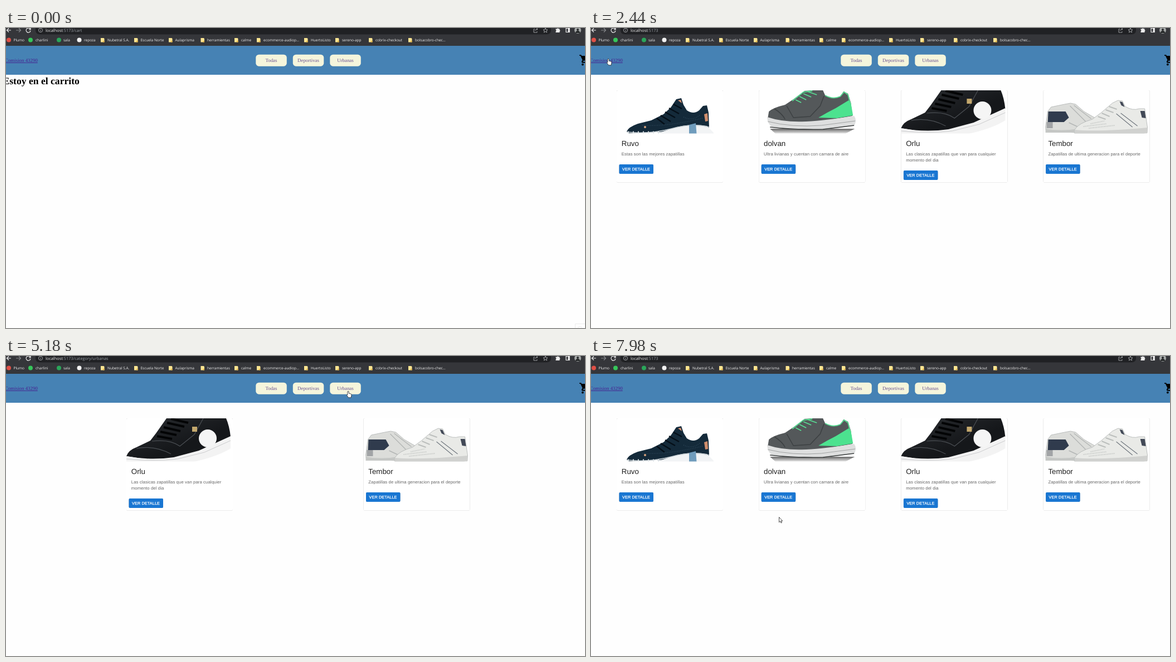
Recreate the animation shown at these times as an HTML page. Size 1039 by 539 pixels, loop 8 s.

```html
<!DOCTYPE html>
<html lang="es">
<head>
<meta charset="utf-8">
<title>Tienda de zapatillas</title>
<style>
html, body { margin: 0; width: 100%; height: 100%; overflow: hidden; background: #fefefe; }
svg { display: block; text-rendering: geometricPrecision; }
.ui { font: 6.5px "Open Sans", "Noto Sans", sans-serif; fill: #f1f1f1; }
.url { font-size: 7.35px; }
.nav { font: 8.87px "Liberation Serif", "Times New Roman", serif; fill: #482090; }
.tab { fill: #6a5290; }
.title { font: 13.3px "Liberation Sans", Arial, sans-serif; fill: #212121; }
.body { font: 7.76px "Liberation Sans", Arial, sans-serif; fill: #666; letter-spacing: .083px; }
.btn { font: 7.2px "Liberation Sans", Arial, sans-serif; fill: #fff; stroke: #fff; stroke-width: .25; letter-spacing: .17px; }
.card { fill: #fff; filter: drop-shadow(0 .8px .6px rgba(0,0,0,.32)); }
.raised { fill: #1976d2; filter: drop-shadow(0 .9px .7px rgba(0,0,0,.4)); }
</style>
</head>
<body>
<svg id="stage" width="1039" height="539" viewBox="0 0 1039 539">
  <defs>
    <clipPath id="photo"><path d="M0 0H191V77.5H0z"/></clipPath>
    <linearGradient id="mirror" x2="0" y2="1"><stop stop-color="#666"/><stop offset="1" stop-color="#eee"/></linearGradient>
    <linearGradient id="leather" y2="1"><stop stop-color="#2b2e32"/><stop offset=".6" stop-color="#15171a"/></linearGradient>

    <g id="trainer">
      <path d="M18 74Q21 66 38 60L62 54 84 43 97 31 107 16 116 14 120 26 126 36Q138 44 148 36L155 28 162 27 165 40 166 67 130 64 96 74 22 77z" fill="#142a3a"/>
      <path d="M74 77L98 69Q130 58 162 64L174 76V78H74z" fill="#f2f4f5"/>
      <path d="M18 75Q60 79 98 69T166 66" fill="none" stroke="#cfd6da" stroke-width="1.5"/>
      <path d="M20 75.5H78" stroke="#d8dee2" stroke-width="4" stroke-dasharray="2 7"/>
      <path d="M130 62L142 59 143.5 78H130z" fill="#6f9cbc"/>
      <path d="M72 50L86 61M79 45L97 56M87 39L105 49M94 32L112 42M102 25L117 33" stroke="#050f18" stroke-width="2.5"/>
      <path d="M46 63Q95 65 154 50M120 48Q136 56 150 44" fill="none" stroke="#2d4658" stroke-width="1.6" stroke-dasharray="1 2"/>
      <path d="M157 43L163 41 164 55 159 56z" fill="#cf8d6c"/>
      <path d="M110 18L115 17 117 23z" fill="#d99474"/>
      <circle cx="51" cy="66" r="2" fill="#d6a27d"/>
    </g>

    <g id="runner">
      <path d="M20 69H172L155 78H30z" fill="url(#mirror)"/>
      <path d="M16 50L18 38Q26 31 47 26L62 16 82 1 96 0H115L119 9Q133 17 146 11L152 2 160 6 165 22 168 46 110 56 40 58z" fill="#54585a"/>
      <path d="M107 49Q122 40 138 32L161 18 165 22 169 45 140 50z" fill="#4ce28f"/>
      <path d="M60 19L80 3 96 1M119 9Q133 17 146 11L153 3 160 8 164 24" fill="none" stroke="#55db91" stroke-width="1.8"/>
      <path d="M66 17L76 22M73 11L85 17M80 6L94 12M87 2L104 8" stroke="#58e295" stroke-width="1.5"/>
      <path d="M28 33Q42 42 47 52M50 28L62 49 92 47 110 28 117 10" fill="none" stroke="#3c4042" stroke-width="1.5"/>
      <path d="M15 48Q45 58 85 56 120 54 171 46 176 53 172 62 140 71 98 70L24 66Q15 60 15 48z" fill="#dedfdf"/>
      <path d="M16 56Q60 67 112 63L173 55" fill="none" stroke="#8e9191" stroke-width=".8"/>
      <path d="M20 66Q60 71 115 70L171 63" fill="none" stroke="#3a3d3d" stroke-width="1.5"/>
    </g>

    <g id="classic">
      <path d="M0 68Q4 57 18 52L43 40 53 27 72 0H179Q185 14 187 33L130 60 85 72 40 74z" fill="url(#leather)"/>
      <path d="M0 68Q42 76 85 70L130 58 187 32V54Q165 68 122 78H0z" fill="#f3f3f3"/>
      <path d="M0 73Q50 78 92 73L140 61 187 40" fill="none" stroke="#bfc1c3" stroke-width=".8"/>
      <path d="M18 54Q50 48 80 64M46 41Q78 37 96 50L122 29 138 0" fill="none" stroke="#4a4e53" stroke-width="1.2"/>
      <path d="M55 32L82 37M61 24L90 30M67 16L97 23M73 8L104 15M80 1L111 8" stroke="#030405" stroke-width="4"/>
      <circle cx="146" cy="36" r="16" fill="#f5f5f5"/>
      <path d="M118 15h9v9h-9z" fill="#c4a86d"/>
    </g>

    <g id="court" stroke-linejoin="round">
      <path d="M4 66L8 38 14 30 38 25 49 23 58 25 73 38 92 49 102 66 58 76 5 73z" fill="#dcddda" stroke="#aeb1b0" stroke-width=".8"/>
      <path d="M9 38L40 38 46 49 37 57 8 57z" fill="#303b4d"/>
      <path d="M48 28L78 58M55 27L86 51M46 58L65 67" stroke="#b3b6b5" stroke-width="1.4"/>
      <path d="M4 69Q32 74 62 69L58 76H4z" fill="#c5c7c5"/>
      <path d="M56 71Q63 59 88 52L104 40 124 23 134 18 142 19 147 29Q160 37 172 33L182 33 187 67 186 77H56z" fill="#e9eae7" stroke="#aeb1b0" stroke-width=".8"/>
      <path d="M98 47L112 52M105 41L119 47M112 35L126 40M118 29L132 34" stroke="#bcbfbd" stroke-width="2"/>
      <path d="M72 65L114 60M82 68L128 63M85 60L110 55" stroke="#bcbfbd" stroke-width="2" stroke-dasharray="1 1.5"/>
      <path d="M131 42L160 66M139 41L169 64" stroke="#727980" stroke-width="1.2"/>
      <path d="M174 37H182L184 50 177 49zM137 20L142 21 146 30 140 27z" fill="#424957"/>
      <path d="M56 71Q100 75 187 67V76L180 78H56z" fill="#d0d1cf"/>
      <path d="M6 57h11v11H6z" fill="#a2a4a6"/>
    </g>
  </defs>

  <path d="M0 0H1039V32H0z" fill="#35363a"/>
  <path d="M53 0H978V5Q977 11.5 970 11.5H61Q54 11.5 53 5z" fill="#202124"/>
  <g fill="none" stroke="#eee" stroke-width="1.2">
    <path d="M9 4H2M5 .5L1.5 4 5 7.5"/>
    <path d="M18 4H26M23 .5L26.5 4 23 7.5" stroke="#85878a"/>
    <path d="M43.5 2A4 4 0 1 0 44 5M44 0V3H41"/>
    <g stroke="#b8babd" stroke-width=".8">
      <circle cx="62" cy="4" r="3.6"/><path d="M62 3.5V6M62 1.8V2.6"/>
      <path d="M949 2H947V8H953V6M949 5Q950 2 954 2M952 0L954 2 952 4"/>
      <path d="M968 0L969.2 3 972 3.2 969.8 5 970.6 8 968 6.4 965.4 8 966.2 5 964 3.2 966.8 3z"/>
    </g>
    <path d="M1005 .5H1011V7.5H1005z"/>
  </g>
  <path d="M1008.5 0H1011.5V8H1008.5zM986.5 1.5H989A1.3 1.3 0 0 1 991.5 1.5H993.5V3.5A1.3 1.3 0 0 1 993.5 6V8H986.5V6A1.3 1.3 0 0 0 986.5 3.5z" fill="#eee"/>
  <circle cx="1026" cy="4" r="6" fill="#a5a8a7"/>
  <path d="M1022 9Q1022 5 1026 5T1030 9zM1024 3a2 2 0 1 0 4 0 2 2 0 1 0-4 0" fill="#252829"/>
  <g id="bookmarks"></g>

  <path d="M0 32H1039V84H0z" fill="#4682b4"/>
  <g fill="#f5f5dc">
    <rect x="448.3" y="47.7" width="55.5" height="21" rx="5.5"/>
    <rect x="514.8" y="47.7" width="55.5" height="21" rx="5.5"/>
    <rect x="581.3" y="47.7" width="55.5" height="21" rx="5.5"/>
  </g>
  <path transform="translate(1028 46.2) scale(.97)" d="M7 18a2 2 0 1 0 0 4 2 2 0 0 0 0-4zM1 2v2h2l3.6 7.6-1.35 2.4c-.7 1.3.2 3 1.75 3h12v-2H7.4l1.1-2h7.45c.75 0 1.4-.4 1.75-1l3.6-6.5c.3-.7-.1-1.5-.9-1.5H5.2l-.9-2zM17 18a2 2 0 1 0 0 4 2 2 0 0 0 0-4z"/>
  <g id="page"></g>
  <g id="cursor"></g>
</svg>
<script>
const $ = id => document.getElementById(id);
const text = (x, y, cls, s, extra = '') => `<text x="${x}" y="${y}" class="${cls}" ${extra}>${s}</text>`;

const bookmarks = [
  [5, 13.5, 'Plumo', '#e05046'], [44, 53, 'charlini', '#36c65a'], [95, 103, 'sala', '#2aa65a'], [131.5, 140, 'repoza', '#f2f2f2'],
  [173, 182, 'Nubetral S.A.'], [233, 241.5, 'Escuela Norte'], [295, 303.5, 'Aulaprisma'], [352.5, 361, 'herramientas'],
  [413, 422, 'calme'], [453, 462, 'ecommerce-audiop...'], [538, 547, 'HuertoListo'], [594, 603, 'sereno-app'],
  [654, 663, 'cobrix-checkout'], [725, 734, 'bolsacobro-chec...']
];
$('bookmarks').innerHTML = bookmarks.map(([x, tx, name, color]) =>
  (color ? `<circle cx="${x}" cy="21.5" r="4" fill="${color}"/>`
    : `<path d="M${x - 3} 18h5.5l1 1.5v6h-6.5z" fill="#ffe592"/><path d="M${x + 1} 23h2.5v2.5h-2.5z" fill="#e5b744"/>`)
  + text(tx, 24, 'ui', name)).join('');

const products = [
  ['trainer', 'Ruvo', 'Estas son las mejores zapatillas'],
  ['runner', 'dolvan', 'Ultra livianas y cuentan con camara de aire'],
  ['classic', 'Orlu', 'Las clasicas zapatillas que van para cualquier', 'momento del dia'],
  ['court', 'Tembor', 'Zapatillas de ultima generacion para el deporte']
];
const views = [
  { at: 0, path: '/cart' },
  { at: 2440, path: '', items: [0, 1, 2, 3] },
  { at: 4170, path: '/category/deportivas', items: [0, 1] },
  { at: 5180, path: '/category/urbanas', items: [2, 3] },
  { at: 6240, path: '', items: [0, 1, 2, 3] }
];
// start, end, steps, waypoints of the pointer
const moves = [
  [510, 1310, 13, [[1010, 535], [600, 330], [150, 110], [24, 59]]],
  [1420, 1420, 1, [[24, 59], [25, 60]]],
  [1690, 1840, 3, [[25, 60], [36, 57]]],
  [2020, 2220, 4, [[36, 57], [31, 55]]],
  [2900, 3640, 12, [[31, 55], [200, 180], [350, 256], [500, 240], [572, 150], [487, 62], [489, 62]]],
  [3720, 3970, 4, [[489, 62], [541, 57]]],
  [4440, 4980, 8, [[541, 57], [614, 63]]],
  [5440, 6060, 9, [[614, 63], [479, 62]]],
  [6970, 7730, 12, [[479, 62], [760, 160], [964, 130], [640, 10], [250, 2], [62, 40], [279, 217]]],
  [7780, 7980, 4, [[279, 217], [300, 290], [320, 318], [337.5, 289.5]]]
];
const clicks = [[2220, 2440, 'home'], [3970, 4170, 'Deportivas'], [4980, 5180, 'Urbanas'], [6060, 6240, 'Todas']];

function pointer(t) {
  const move = moves.findLast(m => t >= m[0]);
  if (!move) return null;
  const [start, end, steps, pts] = move;
  const step = end > start ? Math.min(steps - 1, Math.floor((t - start) / (end - start) * (steps - 1) + 1e-6)) : 0;
  const u = (step + 1) / steps * (pts.length - 1);
  const i = Math.min(pts.length - 2, Math.floor(u));
  return pts[i].map((v, k) => v + (pts[i + 1][k] - v) * (u - i));
}

function card(id, x, bottom) {
  const [art, name, line1, line2] = products[id];
  const y = line2 ? 256 : 245;
  return `<rect class="card" x="${x}" y="112" width="191" height="${bottom - 112}" rx="2"/>
    <g transform="translate(${x} 112)" clip-path="url(#photo)"><use href="#${art}"/></g>`
    + text(x + 8.8, 212, 'title', name) + text(x + 8.8, 229, 'body', line1) + text(x + 8.8, 240, 'body', line2 || '')
    + `<rect class="raised" x="${x + 4.5}" y="${y}" width="61.5" height="17" rx="2"/>`
    + text(x + 10, y + 10.8, 'btn', 'VER DETALLE');
}

function page(t, pressed) {
  const view = views.findLast(v => t >= v.at);
  const red = name => pressed === name ? 'style="fill:#f00"' : '';
  let out = text(71, 7, 'ui url', `localhost<tspan fill="#9aa0a6">:5173${view.path}</tspan>`)
    + text(-2, 61, 'nav', 'Comision 43290', 'text-decoration="underline" ' + red('home'));
  ['Todas', 'Deportivas', 'Urbanas'].forEach((name, i) =>
    out += text(476 + i * 66.5, 61, 'nav tab', name, 'text-anchor="middle" ' + red(name)));
  if (!view.items) {
    out += text(-5.5, 100.5, 'nav', 'Estoy en el carrito', 'style="font-size:17.6px;font-weight:bold;fill:#000"');
    if (t < 70) out += '<path d="M1021.5 539V531.5H1039M1026 538l4-2 4 2" fill="none" stroke="#ececec"/>';
    return out;
  }
  const wide = view.items.length === 4;
  const bottom = view.items.includes(2) ? 277.5 : 266.5;
  return out + view.items.map((id, i) => card(id, wide ? 46 + i * 255.2 : 216 + i * 425.5, bottom)).join('');
}

function cursor(t, pressed) {
  const p = pointer(t);
  if (!p) return '';
  const [x, y] = p;
  const overLink = x < 57 && Math.abs(y - 58) < 5;
  const overButton = y > 47 && y < 69 && [448, 515, 581].some(b => x > b && x < b + 55);
  const shape = overLink || overButton
    ? 'M-1.1 1Q0-1 1.2 1V4.2L4.8 5Q6.2 5.4 6 7L5.2 11.8H.6L-2.6 7.4Q-2.4 6-1.1 7z'
    : 'M0 0V9.3L2.2 7.3 3.6 10.5 5 9.8 3.6 6.8H6.2z';
  return (pressed ? `<circle cx="${x + .5}" cy="${y - .5}" r="6.5" fill="#a5bd58"/>` : '')
    + `<path transform="translate(${x} ${y})" d="${shape}" fill="#fff" stroke="#222" stroke-width=".8"/>`;
}

const shown = {};
function show(id, html) {
  if (shown[id] !== html) $(id).innerHTML = shown[id] = html;
}
function frame() {
  const t = performance.now() % 8000;
  const pressed = clicks.find(([from, to]) => t >= from && t < to)?.[2];
  show('page', page(t, pressed));
  show('cursor', cursor(t, pressed));
  requestAnimationFrame(frame);
}
frame();
</script>
</body>
</html>
```
